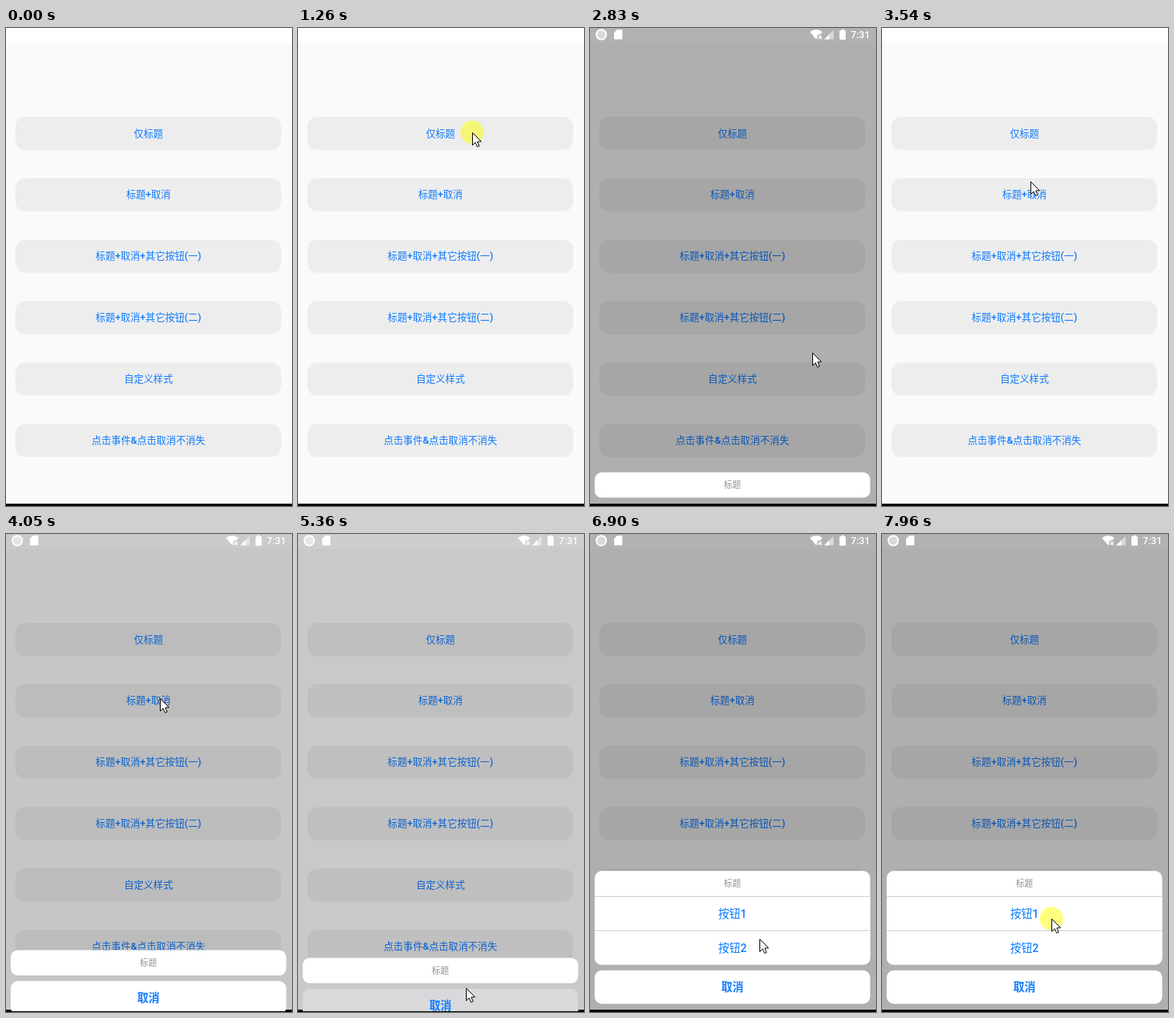
Write an HTML page with a canvas that moves like this. It is 368 px wide and 614 px high and loops after 8 s.

```html
<!DOCTYPE html>
<html lang="zh-CN">
<head>
<meta charset="utf-8">
<title>ActionSheet</title>
<style>
  html, body { margin: 0; width: 100%; height: 100%; overflow: hidden; background: #fafafa; }
  canvas { display: block; width: 368px; height: 614px; }
</style>
</head>
<body>
<canvas id="stage" width="368" height="614"></canvas>
<script>
const ctx = document.getElementById('stage').getContext('2d');
const W = 368, H = 614, LOOP = 8000, CENTER = 183.3;
const BLUE = '#0f7bff', FONT = 'Roboto, "Noto Sans CJK SC", sans-serif';
const MENU = ['仅标题', '标题+取消', '标题+取消+其它按钮(一)', '标题+取消+其它按钮(二)', '自定义样式', '点击事件&点击取消不消失'];

// Pointer gestures: glide to a point, then perhaps tap there
const GESTURES = [
  { start: 280, end: 880, to: [224, 134], tap: 1260 },
  { start: 1520, end: 2280, to: [233, 484] },
  { start: 2340, end: 2830, to: [286, 417], tap: 2990 },
  { start: 3290, end: 3540, to: [191, 197] },
  { start: 3560, end: 3750, to: [198, 211], tap: 3780 },
  { start: 4340, end: 5110, to: [216, 583], tap: 5160, press: '取消' },
  { start: 5370, end: 5840, to: [236, 288], tap: 5970 },
  { start: 6120, end: 6190, to: [254, 297] },
  { start: 6190, end: 7200, to: [214, 541], tap: 7420, press: '按钮2' },
  { start: 7740, end: 7930, to: [218, 494], tap: 7955 },
];
const ENTRY = [368, 570], TAP = 146, PRESS_DELAY = 100, PRESS_END = 310;

const SHEETS = [
  { open: 1505, close: 3135, rows: [], cancel: false },
  { open: 3928, close: 5310, rows: [], cancel: true },
  { open: 6115, close: Infinity, rows: ['按钮1', '按钮2'], cancel: true },
];
const SLIDE = 200, ROW = 44, TITLE = 32.5, SHEET_X = 6, SHEET_W = 354.5, RADIUS = 9;

const progress = (t, start, duration) => Math.max(0, Math.min(1, (t - start) / duration));
const easeOut = u => u * (2 - u);
const within = (t, from, to) => t >= from && t < to;

function rect(x, y, w, h, color) {
  ctx.fillStyle = color;
  ctx.fillRect(x, y, w, h);
}

function box(x, y, w, h, r, color) {
  ctx.beginPath();
  ctx.roundRect(x, y, w, h, r);
  ctx.fillStyle = color;
  ctx.fill();
}

function shape(points, color) {
  ctx.beginPath();
  points.forEach(p => ctx.lineTo(...p));
  ctx.closePath();
  ctx.fillStyle = color;
  ctx.fill();
}

function disc(x, y, r, color) {
  ctx.beginPath();
  ctx.arc(x, y, r, 0, 7);
  ctx.fillStyle = color;
  ctx.fill();
}

// Latin runs are medium weight, Chinese runs regular unless bold
function label(text, y, size, color = BLUE, { x = CENTER, bold = false } = {}) {
  const runs = text.match(/[ -~]+|[^ -~]+/g).map(run => {
    const font = `${bold ? 700 : run < '~' ? 500 : 400} ${size}px ${FONT}`;
    ctx.font = font;
    return { run, font, width: ctx.measureText(run).width };
  });
  let left = x - runs.reduce((sum, r) => sum + r.width, 0) / 2;
  ctx.fillStyle = color;
  for (const { run, font, width } of runs) {
    ctx.font = font;
    ctx.fillText(run, left, Math.round(y + size * 0.34));
    left += width;
  }
}

function page() {
  rect(0, 0, W, H, '#fafafa');
  rect(0, 0, W, 19, '#fff');
  MENU.forEach((text, i) => {
    const y = 114 + i * 78.9;
    box(12, y, 342, 42.7, 13, '#ededed');
    label(text, y + 21.3, 12.57);
  });
}

function statusBar() {
  const faint = 'rgba(255,255,255,.5)';
  disc(14.5, 8.5, 6.3, faint);
  ctx.strokeStyle = '#fff';
  ctx.lineWidth = 2;
  ctx.stroke();
  shape([[35, 2], [41.5, 2], [41.5, 14.5], [31, 14.5], [31, 6]], '#fff');

  ctx.beginPath();
  ctx.moveTo(291, 14.5);
  ctx.lineTo(283, 5);
  ctx.quadraticCurveTo(291, -1, 299, 5);
  ctx.lineTo(296, 8.5);
  ctx.lineTo(292.5, 8.5);
  ctx.lineTo(292.5, 13);
  ctx.fill();
  ctx.lineWidth = 1.4;
  ctx.beginPath();
  ctx.moveTo(294, 10); ctx.lineTo(298, 14);
  ctx.moveTo(298, 10); ctx.lineTo(294, 14);
  ctx.stroke();

  shape([[313.5, 2.5], [313.5, 14.5], [301.5, 14.5]], faint);
  shape([[308, 8], [308, 14.5], [301.5, 14.5]], '#fff');
  box(321, 3, 8, 12, 1, '#fff');
  rect(323.3, 1.7, 3.4, 2, '#fff');
  label('7:31', 9, 12.6, '#fff', { x: 348 });
}

function rowColor(text, t) {
  const pressed = GESTURES.some(({ press, tap }) => press === text && within(t, tap + PRESS_DELAY, tap + PRESS_END));
  return pressed ? '#d9d9db' : '#fff';
}

function drawSheet({ open, close, rows, cancel }, t) {
  const hidden = 1 - easeOut(progress(t, open, SLIDE)) + progress(t, close, SLIDE);
  if (hidden === 1) return;
  const height = TITLE + rows.length * ROW;
  const top = (cancel ? 553.3 : 603.3) - height;

  ctx.save();
  ctx.translate(0, (H - top) * hidden);
  box(SHEET_X, top, SHEET_W, height, RADIUS, '#fff');
  label('标题', top + 16.4, 11, '#8f8f8f');
  rows.forEach((text, i) => {
    const y = top + TITLE + i * ROW;
    const corner = i === rows.length - 1 ? RADIUS : 0;
    box(SHEET_X, y, SHEET_W, ROW, [0, 0, corner, corner], rowColor(text, t));
    rect(SHEET_X, Math.floor(y), SHEET_W, 1, '#d0d0d0');
    label(text, y + 22.4, 14.3);
  });
  if (cancel) {
    box(SHEET_X, 560.5, SHEET_W, 43, RADIUS, rowColor('取消', t));
    label('取消', 582, 14.3, BLUE, { bold: true });
  }
  ctx.restore();
}

function drawPointer(t) {
  const i = GESTURES.findLastIndex(g => g.start <= t);
  if (i < 0) return;
  const { start, end, to, tap } = GESTURES[i];
  const from = i ? GESTURES[i - 1].to : ENTRY;
  const u = easeOut(progress(t, start, end - start));
  const [x, y] = to.map((v, axis) => Math.round(from[axis] + (v - from[axis]) * u));

  if (within(t, tap, tap + TAP)) disc(x, y, 15, 'rgba(255,255,0,.5)');
  ctx.save();
  ctx.translate(x + 0.5, y + 0.5);
  shape([[0, 0], [0, 16], [3.7, 12.5], [6.2, 18], [8.8, 17], [6.4, 11.5], [11.3, 11.3]], '#fff');
  ctx.strokeStyle = '#000';
  ctx.lineWidth = 1;
  ctx.stroke();
  ctx.restore();
}

function frame() {
  const t = performance.now() % LOOP;
  const dim = SHEETS.reduce((sum, { open, close }) =>
    sum + progress(t, open - 30, 220) - progress(t, close - 17, SLIDE), 0);
  page();
  rect(0, 0, W, H, `rgba(0,0,0,${0.3 * dim})`);
  rect(0, 611, W, 3, '#000');
  SHEETS.forEach(sheet => drawSheet(sheet, t));
  rect(0, 613, W, 1, '#000');
  statusBar();
  drawPointer(t);
  requestAnimationFrame(frame);
}
frame();
</script>
</body>
</html>
```
